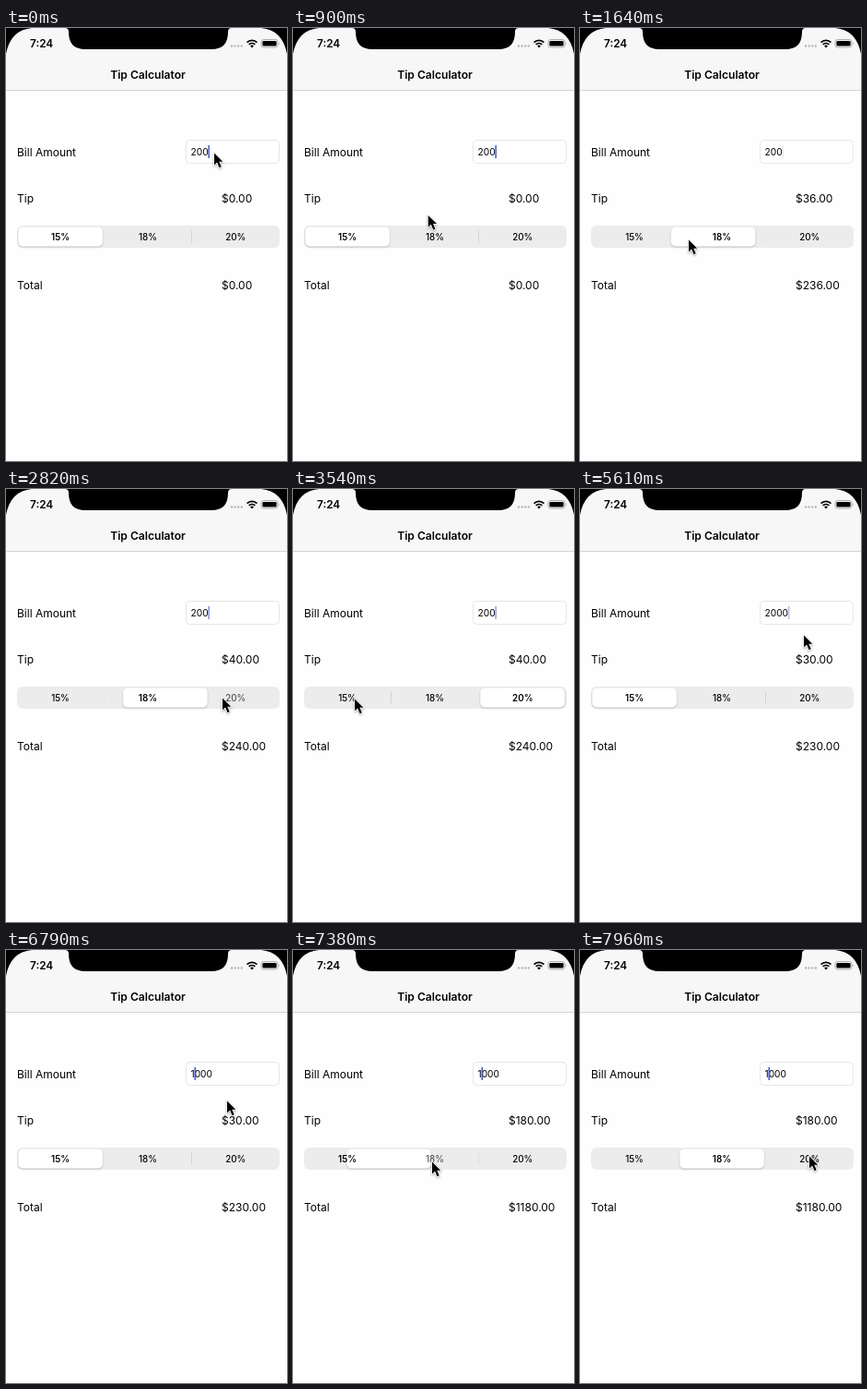
Recreate the animation shown at these times as an HTML page. Size 305 px wide and 469 px high, loop 8 s.

```html
<!DOCTYPE html>
<html lang="en">
<head>
<meta charset="utf-8">
<title>Tip Calculator</title>
<style>
  html, body { margin: 0; width: 100%; height: 100%; overflow: hidden; background: #fefefe; }
  svg { display: block; width: 305px; height: 469px; font: 12px Inter, sans-serif; fill: #000; }
  .segment { font-size: 9.8px; font-weight: 500; text-anchor: middle; }
  .divider { fill: #d3d3d6; }
  #thumb { fill: #fff; filter: drop-shadow(0 1px 1.2px #0003); }
  #pointer { filter: drop-shadow(0 1px 1px #0005); }
</style>
</head>
<body>
<svg viewBox="0 0 305 469">
  <rect width="305" height="469" fill="#fefefe"/>
  <rect width="305" height="67" fill="#f7f7f7"/>
  <rect y="67" width="305" height="1" fill="#d4d4d4"/>

  <!-- screen corners and notch -->
  <path d="M0 0H28Q5 2 0 28ZM305 0H277Q300 2 305 28Z"/>
  <path d="M64 0Q68 0 68 4C68 17 74 23 86 23H223C235 23 241 17 241 4Q241 0 245 0Z"/>

  <!-- status bar -->
  <text x="26" y="21" font-size="11.8" font-weight="600">7:24</text>
  <path d="M245 19.5h11" stroke="#b8b8b8" stroke-width="2.5" stroke-linecap="round" stroke-dasharray="0 3.6"/>
  <g fill="none" stroke="#000" stroke-width="1.8">
    <path d="M261.6 15.6a7.6 7.6 0 0 1 10.8 0M263.7 17.9a4.7 4.7 0 0 1 6.6 0"/>
  </g>
  <path d="M267 21.4l-1.9-2a2.7 2.7 0 0 1 3.8 0Z"/>
  <rect x="277" y="12.5" width="18" height="8.5" rx="2.6" fill="none" stroke="#999" stroke-width=".8"/>
  <rect x="278.4" y="13.9" width="15.2" height="5.7" rx="1.4"/>
  <path d="M296.2 15.2q1.4 1.5 0 3Z" fill="#999"/>

  <text x="154" y="55" font-size="12.1" font-weight="600" text-anchor="middle">Tip Calculator</text>
  <text x="12" y="138.5">Bill Amount</text>
  <text x="12" y="189">Tip</text>
  <text x="12" y="283">Total</text>
  <text id="tip" x="234" y="189"></text>
  <text id="total" x="234" y="283"></text>

  <rect x="195.5" y="121.5" width="101" height="25" rx="4" fill="#fff" stroke="#e6e6e6"/>
  <text id="bill" x="200.5" y="138" font-size="10.2"></text>
  <rect id="caret" y="127" width="1.5" height="14" fill="#4059cf"/>

  <rect x="12" y="214" width="285" height="24" rx="6" fill="#ececed"/>
  <rect class="divider" x="106" y="219.5" width="1" height="13"/>
  <rect class="divider" x="201" y="219.5" width="1" height="13"/>
  <rect id="thumb" y="215.5" width="91.5" height="21" rx="5"/>
  <text class="segment" x="59" y="229.5">15%</text>
  <text class="segment" x="154" y="229.5">18%</text>
  <text class="segment" x="249.3" y="229.5">20%</text>

  <path id="pointer" d="M1 1.6V14.4L4.1 11.5L6.5 17.2L8.7 16.3L6.3 10.7H10.3Z"
        stroke="#fff" stroke-width="1.5" paint-order="stroke"/>
</svg>
<script>
const LOOP = 8000, TICK = 147.3, SLIDE = 300;
const RATES = [0.15, 0.18, 0.2];

// [time, selected segment]
const taps = [[1379, 1], [2713, 2], [3722, 0], [7220, 1]];

// [time, field text, caret index]
const edits = [
  [-150, '200', 3], [4880, '2000', 4], [5880, '2000', 3], [6030, '2000', 2],
  [6180, '2000', 1], [6470, '000', 0], [6770, '1000', 1],
];

// [time, x, y]
const path = [
  [0, 225, 134], [380, 225, 134], [1170, 112, 230], [1340, 112, 230],
  [1620, 117, 228], [2500, 234, 225], [2800, 234, 225], [3680, 53, 226],
  [3980, 53, 226], [4270, 242, 157], [6640, 242, 157], [6776, 239, 162],
  [7215, 150, 228], [7370, 150, 228], [7800, 240, 223], [7954, 248, 222],
];

const $ = id => document.getElementById(id);
const labels = document.querySelectorAll('.segment');
const dividers = document.querySelectorAll('.divider');
const clamp = v => Math.min(1, Math.max(0, v));
const smooth = v => (v = clamp(v), v * v * (3 - 2 * v));
const mix = (a, b, p) => a + (b - a) * p;
const money = v => '$' + v.toFixed(2);
const editAt = t => edits.findLast(e => e[0] <= t);

function drawPointer(t) {
  const i = path.findLastIndex(k => k[0] <= t);
  const a = path[i], b = path[i + 1] || a;
  const p = smooth((t - a[0]) / (b[0] - a[0] || 1));
  $('pointer').setAttribute('transform', `translate(${mix(a[1], b[1], p)} ${mix(a[2], b[2], p)})`);
}

function drawField(t) {
  const [start, text, index] = editAt(t);
  const bill = $('bill'), caret = $('caret');
  bill.textContent = text;
  const offset = index ? bill.getSubStringLength(0, index) : 0;
  caret.setAttribute('x', 200.3 + offset);
  const phase = (t - start) % 1000;
  caret.setAttribute('opacity', clamp((800 - phase) / 200) + clamp((phase - 850) / 150));
}

function drawSegments(t) {
  let selected = 0, position = 0, pressed = -1, tip = 0, total = 0;
  for (const [time, target] of taps) {
    if (t < time) break;
    const p = smooth((t - time) / SLIDE);
    position = mix(position, target, p);
    pressed = p < 0.5 ? target : -1;
    if (p >= 0.5) selected = target;
    const bill = +editAt(time)[1];
    tip = bill * RATES[target];
    total = bill + tip;
  }
  $('thumb').setAttribute('x', 13.3 + 95 * position);
  dividers[0].setAttribute('opacity', clamp(position - 1));
  dividers[1].setAttribute('opacity', clamp(1 - position));
  labels.forEach((label, i) => {
    label.style.fontWeight = i === selected ? 600 : 500;
    label.style.opacity = i === pressed ? 0.65 : 1;
  });
  $('tip').textContent = money(tip);
  $('total').textContent = money(total);
}

function draw() {
  // the screen refreshes in fixed ticks
  const t = Math.floor(performance.now() % LOOP / TICK) * TICK;
  drawPointer(t);
  drawField(t);
  drawSegments(t);
  requestAnimationFrame(draw);
}
draw();
</script>
</body>
</html>
```
